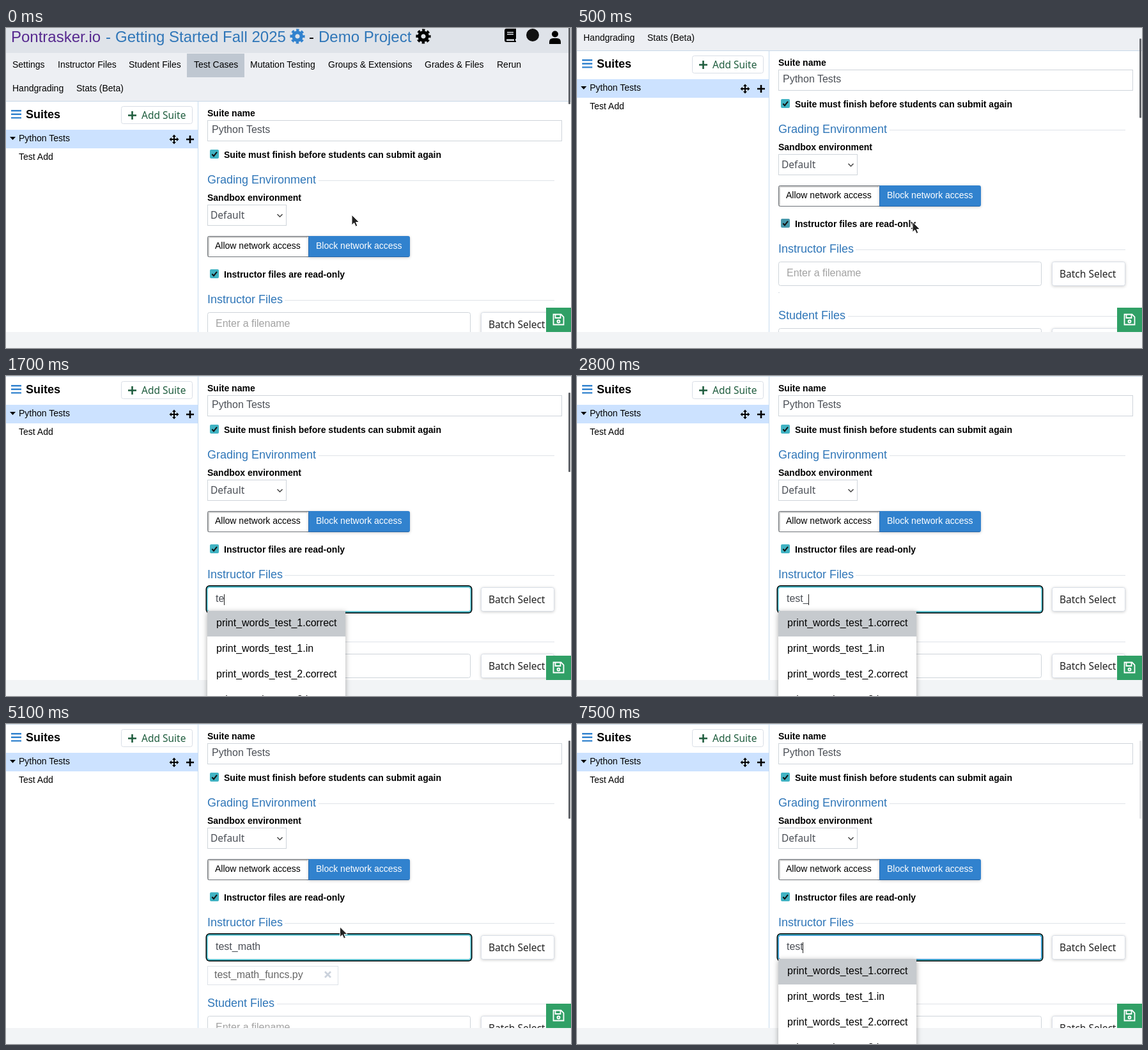
An HTML page for the animation above (8 s loop, 884x500 px).

```html
<!DOCTYPE html>
<html lang="en">
<head>
<meta charset="utf-8">
<title>Suite editor</title>
<style>
  html, body { margin: 0; width: 100%; height: 100%; overflow: hidden; background: #f2f4f6; }
  svg { display: block; width: 884px; height: 500px; font: 14px "Liberation Sans", Arial, sans-serif; }
  text { white-space: pre; }
  .b { font-weight: bold; }
  .t { font-size: 24px; }
  .h { font-size: 18px; }
  .i { font-size: 16px; }
  .n { font-family: "Noto Sans", "Open Sans", sans-serif; font-size: 15.5px; }
  .blue { fill: #2f76b8; }
  .grey { fill: #4b4f56; }
  .hint { fill: #a2a2a2; }
  .field { fill: #fff; stroke: #ced4da; }
  .rule { fill: #dfe3e8; }
  .btn { fill: #fff; stroke: #d9dee6; }
  .lift { filter: drop-shadow(0 1px 2px #0003); }
  .drop { filter: drop-shadow(0 2px 4px #0005); }
</style>
</head>
<body>
<svg viewBox="0 0 884 500">
  <defs>
    <clipPath id="page"><path d="M0 0H884V475H0Z"/></clipPath>
    <g id="gear">
      <circle r="6.2" fill="none" stroke="currentColor" stroke-width="5.2"/>
      <circle r="9.6" fill="none" stroke="currentColor" stroke-width="4" stroke-dasharray="4.2 3.34" stroke-dashoffset="2.1"/>
    </g>
    <g id="check">
      <rect x="319" y="-7" width="14" height="14" rx="2" fill="currentColor"/>
      <path d="M322.3 .2l2.7 2.9 5-6.2" fill="none" stroke="#111" stroke-width="2"/>
    </g>
    <g id="batch">
      <rect class="btn lift" x="743.5" y=".5" width="114" height="37" rx="3"/>
      <text class="n" x="755" y="25" fill="#222">Batch Select</text>
    </g>
  </defs>

  <g clip-path="url(#page)">
    <rect width="884" height="475" fill="#fff"/>
    <g id="world">
      <rect width="884" height="40" fill="#dfe3e9"/>
      <rect y="39" width="884" height="75" fill="#edeff3"/>
      <rect y="114" width="884" height="1" fill="#c9d9e8"/>
      <rect x="283" y="40" width="90" height="37" fill="#bfc7d1"/>

      <text class="t" x="8" y="22" fill="#57298f">Pontrasker.io</text>
      <g class="t blue">
        <text x="156" y="22">-</text>
        <text x="171" y="22">Getting Started Fall 2025</text>
        <text x="489" y="22">Demo Project</text>
      </g>
      <text class="t" x="474" y="22">-</text>
      <use href="#gear" x="456" y="13" color="#3182ce"/>
      <use href="#gear" x="653" y="13"/>
      <path fill-rule="evenodd" d="M783 1H798V17H797V20H798V22H783Q780 22 780 19V4Q780 1 783 1ZM784 6V7.500H794V6ZM784 9V10.500H794V9ZM783.500 17.500Q782 18.700 783.500 20H795V17.500Z"/>
      <circle cx="824" cy="11" r="10" fill="#111"/>
      <circle cx="859" cy="9.500" r="5"/>
      <path d="M850 25V22Q850 16 856 16H862Q868 16 868 22V25Z"/>

      <g id="nav"></g>

      <rect x="300" y="115" width="1" height="700" fill="#c6dbee"/>
      <path d="M8 129.200H24M8 134.800H24M8 140.400H24" stroke="#3182ce" stroke-width="2.400"/>
      <text class="h b" x="31" y="141">Suites</text>
      <rect class="btn" x="180.500" y="122.500" width="111" height="27" rx="3"/>
      <path d="M191 136.500H204M197.500 130V143" stroke="#1f5d3e" stroke-width="2.600"/>
      <text class="n" x="212" y="142" fill="#1f5d3e">Add Suite</text>
      <rect y="159" width="300" height="29" fill="#cce2ff"/>
      <path d="M6 170H15L10.500 175Z"/>
      <text x="20" y="177">Python Tests</text>
      <text x="20" y="206">Test Add</text>
      <path d="M258 174H268M263 169V179" stroke="#000" stroke-width="2"/>
      <path d="M263 166.500l3 3.500h-6ZM263 181.500l3-3.500h-6ZM255.500 174l3.500-3v6ZM270.500 174l-3.500-3v6Z"/>
      <path d="M282 174H294M288 168V180" stroke="#000" stroke-width="2.600"/>

      <text class="b" x="315" y="138">Suite name</text>
      <rect class="field" x="315.500" y="144.500" width="554" height="32"/>
      <text class="i grey" x="322" y="164">Python Tests</text>
      <use href="#check" y="197" color="#41b3c3"/>
      <text class="b" x="341" y="203">Suite must finish before students can submit again</text>

      <text class="h blue" x="315" y="243">Grading Environment</text>
      <rect class="rule" x="489" y="238" width="369" height="1"/>
      <text class="b" x="315" y="270">Sandbox environment</text>
      <rect class="field" x="315.500" y="276.500" width="123" height="32"/>
      <text class="n grey" x="320" y="298">Default</text>
      <path d="M424.500 291l4 4 4-4" fill="none" stroke="#444" stroke-width="1.500"/>

      <rect x="315.500" y="325.500" width="160" height="32" rx="2" fill="#fff" stroke="#6d7278"/>
      <path d="M317 357V327H472" fill="none" stroke="#0003" stroke-width="2"/>
      <g class="lift">
        <path d="M473 325H629Q632 325 632 328V355Q632 358 629 358H473Z" fill="#3182ce"/>
        <path d="M473 357.500H630" stroke="#2767a8"/>
        <path d="M473.500 325V358" stroke="#2b6cb0"/>
      </g>
      <text x="327" y="345">Allow network access</text>
      <text x="485" y="345" fill="#fff">Block network access</text>
      <use id="readonly" href="#check" y="384" color="#41b3c3"/>
      <text class="b" x="341" y="390">Instructor files are read-only</text>

      <text class="h blue" x="315" y="430">Instructor Files</text>
      <rect class="rule" x="436" y="425" width="422" height="1"/>
      <g id="ring">
        <rect x="312.500" y="441" width="417" height="44" rx="6"/>
        <rect x="314" y="442.500" width="414" height="41" rx="4.500" fill="#45bccb"/>
      </g>
      <rect id="entry" class="field" x="315.500" y="444.500" width="411" height="37" rx="3"/>
      <text id="hint" class="i hint" x="328" y="467">Enter a filename</text>
      <text id="typed" class="i grey" x="328" y="467"></text>
      <rect id="caret" y="455" width="1" height="17" fill="#222"/>
      <use href="#batch" y="444"/>

      <rect id="empty" x="315" y="492" width="2" height="1" fill="#d8dde4"/>
      <g id="chip">
        <rect x="315.500" y="492.500" width="204" height="29" fill="#fff" stroke="#dde2e8"/>
        <text class="i" x="326" y="511" fill="#666">test_math_funcs.py</text>
        <path d="M499 501l9 9m0-9l-9 9" stroke="#cbd2dc" stroke-width="2.800"/>
      </g>

      <g id="student">
        <text class="h blue" x="315" y="534">Student Files</text>
        <rect class="rule" x="424" y="529" width="434" height="1"/>
        <rect class="field" x="315.500" y="548.500" width="411" height="37" rx="3"/>
        <text class="i hint" x="328" y="571">Enter a filename</text>
        <use href="#batch" y="548"/>
      </g>
    </g>

    <rect id="thumb" x="880" width="3" rx="1" fill="#5f6267"/>
    <rect x="845" y="437" width="39" height="38" fill="#30a066"/>
    <g fill="none" stroke="#fff" stroke-width="1.800">
      <path d="M857 447.500H868.500L872.500 451.500V463.500H856.500V447.500Z"/>
      <path d="M859.500 448V453H867.500V448"/>
      <circle cx="864.500" cy="458.500" r="2"/>
    </g>
  </g>

  <g id="menu"></g>

  <path id="arrow" d="M0 0V16L3.700 12.600 6.200 18.200 8.900 17 6.500 11.500H11.500Z" fill="#222" stroke="#fff" stroke-width="1"/>
  <g id="beam" fill="none">
    <path d="M-3-6.500H3M-3 6.500H3M0-6.500V6.500" stroke="#fff" stroke-width="3"/>
    <path d="M-3-6.500H-.8M.8-6.500H3M-3 6.500H-.8M.8 6.500H3M0-6V6" stroke="#111" stroke-width="1.200"/>
  </g>
</svg>
<script>
const $ = id => document.getElementById(id);
const LOOP = 8000;

// Each row: start time, then the value held until the next row.
const scrolls = [[0, 0], [400, 40], [500, 79], [600, 100], [700, 110], [800, 114]];
const typing = [[0, ''], [1200, 't'], [1700, 'te'], [1800, 'tes'], [1900, 'test'], [2800, 'test_'],
  [3200, 'test_m'], [3400, 'test_ma'], [3500, 'test_mat'], [3600, 'test_math'],
  [7200, 'test_mat'], [7300, 'test_m'], [7400, 'test_'], [7500, 'test']];
const carets = [[0, 0], [1000, 1], [4900, 0], [6500, 1]];
const menus = [[0, ''], [1200, 'words'], [3200, 'math'], [5100, ''], [6500, 'none'], [7400, 'words']];
const bars = [[0, 1], [2400, .6], [2500, .25], [2600, 0], [4100, .5], [4200, 1], [7400, .6], [7500, .16]];
const hovers = [[0, 0], [800, 1], [1200, 0], [6200, 1]];
const pointers = [[0, ['arrow', 541, 292]], [100, ['arrow', 533, 297]], [200, ['arrow', 527, 301]],
  [400, ['arrow', 526, 302]], [500, ['arrow', 525, 303]], [600, ['arrow', 516, 313]],
  [700, ['arrow', 504, 328]], [800, ['beam', 497, 337]], [1200, ['']],
  [4100, ['arrow', 526, 317]], [4200, ['arrow', 524, 317]], [4400, ['arrow', 522.5, 317]],
  [6100, ['arrow', 519, 324]], [6200, ['beam', 515, 336]], [6300, ['beam', 513, 341]], [7200, ['']]];

const at = (rows, t) => rows.findLast(row => row[0] <= t)[1];
const show = (id, on) => $(id).style.display = on ? '' : 'none';
const move = (id, x, y) => $(id).setAttribute('transform', `translate(${x} ${y})`);

const tabs = [[10, 'Settings'], [81, 'Instructor Files'], [192, 'Student Files'], [294, 'Test Cases'],
  [382, 'Mutation Testing'], [504, 'Groups &amp; Extensions'], [655, 'Grades &amp; Files'], [768, 'Rerun'],
  [10, 'Handgrading'], [110, 'Stats (Beta)']];
$('nav').innerHTML = tabs.map(([x, name], i) => `<text x="${x}" y="${i < 8 ? 62 : 99}">${name}</text>`).join('');

function list(names, width) {
  const rows = names.map((name, i) => {
    const y = 367 + 40 * i;
    return `<rect x="315" y="${y}" width="${width}" height="40" fill="${i ? '#fff' : '#c6cace'}"/>
      <rect x="315" y="${y + 40}" width="${width}" height="1" fill="#e3e5e8"/>
      <text class="i" x="329" y="${y + 24}">${name}</text>`;
  });
  return `<g class="drop">${rows.join('')}</g>`;
}

function menuMarkup(kind, query) {
  if (kind === 'words') return list([1, 2].flatMap(n => ['correct', 'in'].map(e => `print_words_test_${n}.${e}`)), 216);
  if (kind === 'math') return list(['test_math_funcs.py'], 167);
  if (kind === 'none') return `<g class="drop"><rect x="315" y="368" width="384" height="40" fill="#fff"/>
    <text class="i" x="329" y="392">We couldn't find any results containing: '${query}'</text></g>`;
  return '';
}

let lastMenu;
function draw(t) {
  const scroll = at(scrolls, t), text = at(typing, t), added = t >= 5100;
  move('world', 0, -scroll);
  move('student', 0, added ? 22 : 0);
  show('chip', added);
  show('empty', !added);
  show('ring', t >= 1000);
  $('entry').style.stroke = at(hovers, t) ? '#3182ce' : t >= 1000 ? '#8fcfd8' : '';
  $('readonly').setAttribute('color', t >= 400 && t < 700 ? '#4798ab' : '#41b3c3');

  show('hint', !text);
  $('typed').textContent = text;
  show('caret', at(carets, t));
  $('caret').setAttribute('x', 328 + Math.round(text ? $('typed').getComputedTextLength() - .4 : 0));

  $('thumb').setAttribute('y', -5 + scroll * .272);
  $('thumb').setAttribute('height', added ? 122 : 124);
  $('thumb').style.opacity = at(bars, t);

  const markup = menuMarkup(at(menus, t), text);
  if (markup !== lastMenu) $('menu').innerHTML = lastMenu = markup;

  const [shape, x, y] = at(pointers, t);
  for (const id of ['arrow', 'beam']) show(id, id === shape);
  if (shape) move(shape, x, y);
}

function tick() {
  draw(performance.now() % LOOP);
  requestAnimationFrame(tick);
}
tick();
</script>
</body>
</html>
```
